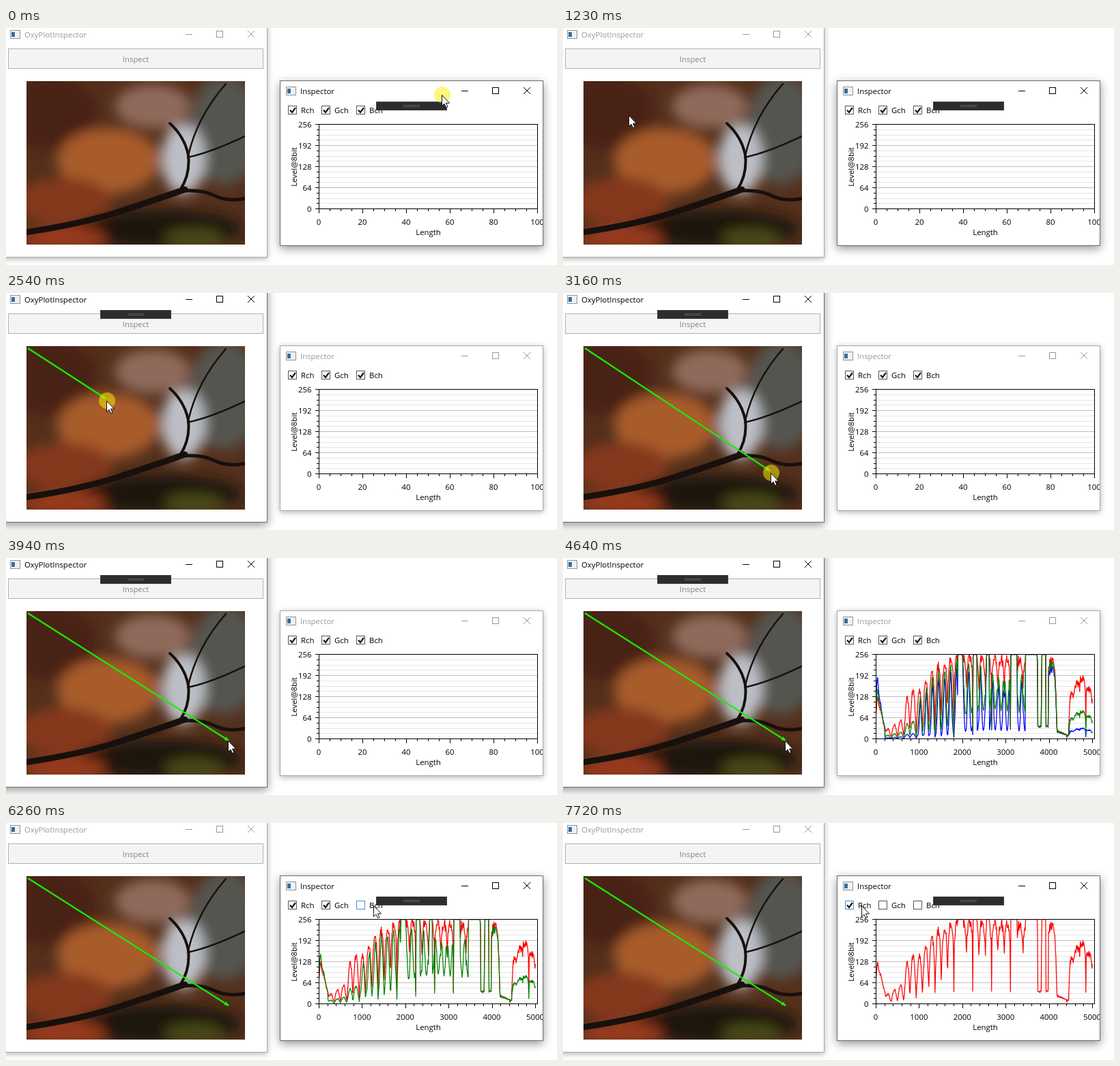
An HTML page that plays this animation: 807x348 px, repeating every 8 s.

```html
<!DOCTYPE html>
<html lang="en">
<head>
<meta charset="utf-8">
<title>Line inspector</title>
<style>
  html, body { margin: 0; width: 100%; height: 100%; overflow: hidden; background: #fff; }
  svg { display: block; width: 807px; height: 348px; }
  text { font: 11.4px "Open Sans", "Noto Sans", sans-serif; fill: #000; }
  .crisp { shape-rendering: crispEdges; }
  .frame { fill: #fff; stroke: #a9a9a9; filter: drop-shadow(0 2px 4px rgba(0,0,0,.3)); }
  .active .frame { stroke: #6c6c6c; filter: drop-shadow(0 4px 7px rgba(0,0,0,.42)); }
  .title { fill: #959b98; }
  .active .title { fill: #000; }
  .controls { fill: none; stroke: #999; }
  .active .controls { stroke: #000; }
  .toolbar { visibility: hidden; }
  .active .toolbar { visibility: visible; }
  .box { fill: #fff; stroke: #555; }
  .hover .box { stroke: #4a90d9; }
  .curve { fill: none; stroke-width: 1.25; stroke-linejoin: round; }
</style>
</head>
<body>
<svg id="stage" viewBox="0 0 807 348"></svg>
<script>
const LOOP = 8000;
const STEP = 77;
const PLOT = { x: 458, w: 320, h: 124, bottom: 265.5 };
const CHANNELS = [
  { name: "Rch", x: 413, color: "#ff0000", off: Infinity },
  { name: "Gch", x: 462, color: "#008000", off: 7180 },
  { name: "Bch", x: 513, color: "#0000ff", off: 6180 }
];

// ---------- helpers ----------
const lerp = (a, b, f) => a + (b - a) * f;
const clamp = (v, lo, hi) => Math.max(lo, Math.min(hi, v));
const range = n => Array.from({ length: n }, (_, i) => i);
const within = (v, spans) => spans.some(([a, b]) => v >= a && v < b);

function seeded(seed) {
  return () => (seed = (seed * 16807) % 2147483647) / 2147483647;
}

function between(points, x) {
  const i = clamp(points.findIndex(p => p[0] > x), 1, points.length - 1);
  const [[x0, y0], [x1, y1]] = [points[i - 1], points[i]];
  return lerp(y0, y1, clamp((x - x0) / (x1 - x0), 0, 1));
}

const label = (x, y, s, anchor = "start", extra = "") =>
  `<text x="${x}" y="${y}" text-anchor="${anchor}" ${extra}>${s}</text>`;

// ---------- window parts ----------
const appIcon = (x, y) => `<g transform="translate(${x} ${y})" class="crisp">
  <rect x=".5" y=".5" width="14" height="12" fill="#eef1f3" stroke="#8d9396"/>
  <rect x="2" y="3" width="5" height="7" fill="#326f9f"/></g>`;

const controls = (x, y) => `<g class="controls" transform="translate(${x} ${y})">
  <path class="crisp" d="M0 5.5h10M45.5 .5h9v9h-9z"/><path d="M91 0l10 10m0-10l-10 10"/></g>`;

const toolbar = (x, y) => `<g class="toolbar crisp" transform="translate(${x} ${y})">
  <rect x=".5" y=".5" width="103" height="12" fill="#2d2d30" stroke="#3f3f46"/>
  <path d="M40 5.5h24M40 7.5h24" stroke="#5c5c60"/></g>`;

// ---------- photo: soft patches of colour and a dark branch ----------
const patch = (x, y, rx, ry, color) =>
  `<ellipse cx="${x}" cy="${y}" rx="${rx}" ry="${ry}" fill="${color}"/>`;

const photo = () => `<g clip-path="url(#photoClip)">
  <rect x="30" y="78" width="320" height="240" fill="#54301c"/>
  <g filter="url(#soft)">
    ${patch(65, 125, 70, 55, "#4a2012")}
    ${patch(215, 115, 55, 32, "#8f6a5c")}
    ${patch(320, 150, 52, 80, "#55544f")}
    ${patch(260, 192, 32, 52, "#bcc0c6")}
    ${patch(150, 195, 75, 48, "#a85c2a")}
    ${patch(85, 255, 70, 35, "#84391a")}
    ${patch(225, 295, 120, 28, "#1a170f")}
    ${patch(85, 308, 62, 16, "#9a3a1a")}
    ${patch(275, 308, 44, 14, "#474a18")}
  </g>
  <g fill="none" stroke="#17100d" stroke-linecap="round">
    <path d="M28 300Q110 288 165 270T262 237" stroke-width="9"/>
    <path d="M250 240Q285 236 305 246T352 250" stroke-width="5"/>
    <path d="M255 238Q270 215 267 187Q262 160 240 140" stroke-width="4"/>
    <path d="M266 190Q300 183 352 158M267 187Q280 130 322 82" stroke-width="2.5"/>
  </g></g>`;

// ---------- chart ----------
function xAxis(id, spacing, unit) {
  const tick = (step, length) => range(Math.floor(PLOT.w / step) + 1)
    .map(i => `M${Math.round(PLOT.x + i * step) + .5} 266v${length}`).join("");
  const names = range(6).map(i => label(PLOT.x + i * spacing, 289, i * unit, "middle")).join("");
  const minor = unit === 20 ? spacing / 4 : spacing / 5;
  return `<g id="${id}"><path class="crisp" d="${tick(minor, 3)}${tick(spacing, 6)}" stroke="#000"/>${names}</g>`;
}

function yAxis() {
  return range(17).map(i => {
    const y = Math.round(265 - i * PLOT.h / 16) + .5, major = i % 4 === 0;
    const grid = major ? 'stroke="#bdbdbd"' : 'stroke="#cacaca" stroke-dasharray="1 1"';
    return `<path class="crisp" d="M${major ? 453 : 455} ${y}H458" stroke="#000"/>
      <path class="crisp" d="M459 ${y}H778" ${grid}/>
      ${major ? label(447.5, y + 4.5, i * 16, "end") : ""}`;
  }).join("");
}

// The profile crosses leaves, with bright sky and dark twigs in places.
const LEAVES = [[0, 40], [2, 60], [14, 12], [40, 30], [48, 74], [62, 66], [80, 98], [110, 120],
  [262, 116], [265, 12], [282, 6], [284, 62], [300, 92], [317, 66]];
const SKY = [[120, 127], [142, 148], [162, 166], [197, 207], [219, 236], [243, 249]];
const TWIGS = [[237, 242], [249, 252]];

function redAt(x) {
  if (within(x, SKY)) return 124;
  if (within(x, TWIGS)) return 18;
  const sharpness = x < 16 ? 0 : x > 252 ? .08 : lerp(1.6, .2, Math.min(1, x / 125));
  const wave = Math.abs(Math.cos((x - 45) * Math.PI / 9.2)) ** sharpness;
  return between(LEAVES, x) * lerp(.15, 1, wave);
}

// Green follows red fully in the sky, and less on sunlit leaves.
function greenGain(x) {
  if (within(x, SKY) || within(x, TWIGS)) return 1;
  if (x < 13) return 1.25 - x / 40;
  if (x > 220) return x < 283 ? .95 : .45;
  const shine = x > 60 ? Math.sin(x * .36) ** 2 : 0;
  return lerp(.36, .92, shine);
}

function curve({ name, color }, power) {
  const random = seeded(71);
  const points = range(529).map(i => {
    const x = i * .6, red = redAt(x);
    const jitter = red > 122 ? 0 : (random() - .5) * (2 + red / 8);
    const h = clamp((red + jitter) * greenGain(x) ** power, 1, PLOT.h);
    return `${(PLOT.x + x + .5).toFixed(1)} ${(PLOT.bottom - h).toFixed(1)}`;
  });
  return `<path id="curve${name}" class="curve" stroke="${color}" d="M${points.join("L")}"/>`;
}

const checkBox = ({ name, x }) => `<g id="${name}">
  <rect class="box crisp" x="${x + .5}" y="114.5" width="12" height="12"/>
  <path class="mark" d="M${x + 3} 120.5l3 3.5 5-7" fill="none" stroke="#1b1b1b" stroke-width="2.2"/>
  ${label(x + 19, 125, name)}</g>`;

// ---------- scene ----------
const [R, G, B] = CHANNELS;
document.getElementById("stage").innerHTML = `
  <defs>
    <clipPath id="photoClip"><rect x="30" y="78" width="320" height="240"/></clipPath>
    <clipPath id="plotClip"><rect x="458" y="141" width="320" height="125"/></clipPath>
    <clipPath id="windowClip"><rect x="402" y="78" width="384" height="241"/></clipPath>
    <filter id="soft"><feGaussianBlur stdDeviation="9"/></filter>
  </defs>
  <g id="mainWindow">
    <rect class="frame" x="-20.5" y="-20.5" width="403" height="357"/>
    ${appIcon(6, 3)}${label(27, 14, "OxyPlotInspector", "start", 'class="title"')}${controls(263, 4)}
    <rect class="crisp" x="3.5" y="30.5" width="373" height="29" fill="#f4f4f4" stroke="#adb2b5"/>
    ${label(190, 50, "Inspect", "middle", 'style="fill:#838383"')}
    ${photo()}
    <g id="ruler" fill="#14f000" stroke="#14f000">
      <path id="rulerLine" stroke-width="2.2"/>
      <path id="rulerHead" d="M1 0L-6 -3V3Z" stroke="none"/>
    </g>
    ${toolbar(138, 25)}
  </g>
  <g id="chartWindow">
    <rect class="frame" x="401.5" y="77.5" width="385" height="242"/>
    ${appIcon(410, 86)}${label(431, 97, "Inspector", "start", 'class="title"')}${controls(667, 87)}
    ${CHANNELS.map(checkBox).join("")}
    <g clip-path="url(#windowClip)">
      ${yAxis()}
      ${xAxis("emptyAxis", 64, 20)}${xAxis("dataAxis", 63.4, 1000)}
      <g id="curves" clip-path="url(#plotClip)">${curve(B, 2.2)}${curve(R, 0)}${curve(G, 1)}</g>
      <rect class="crisp" x="458.5" y="141.5" width="320" height="124" fill="none" stroke="#000"/>
      ${label(618.5, 304, "Length", "middle")}
      ${label(0, 0, "Level@8bit", "middle", 'transform="translate(426 204) rotate(-90)"')}
    </g>
    ${toolbar(542, 108)}
  </g>
  <g id="pointer">
    <circle id="press" r="12" fill="#fff000" fill-opacity=".52"/>
    <path d="M-.5 .5V16.5L3 13.2L5.6 18.6L8 17.5L5.5 12.2H10.5Z" fill="#fff" stroke="#111"/>
  </g>`;

// ---------- motion ----------
const smooth = f => f * f * (3 - 2 * f);
const speedUp = f => f ** 1.3;
const slowDown = f => 1 - (1 - f) ** 2;

const MOVES = [
  { from: 460, to: 1230, x: 97, y: 128 },
  { from: 1300, to: 2000, x: 38, y: 84 },
  { from: 2160, to: 2540, x: 148, y: 158, ease: speedUp },
  { from: 2610, to: 2930, x: 271, y: 257, ease: f => f },
  { from: 3000, to: 3540, x: 326, y: 268, ease: slowDown },
  { from: 5100, to: 5640, x: 537, y: 127 },
  { from: 5870, to: 6260, x: 539, y: 121 },
  { from: 6720, to: 7030, x: 491, y: 121 },
  { from: 7410, to: 7720, x: 438, y: 121 }
];
const PRESSES = [[0, 230], [2000, 3860], [5950, 6180], [7030, 7180]];
const MAIN_ACTIVE = [[2000, 5950]];
const DRAG = { from: 2160, to: 3860, x: 32, y: 81 };
const DATA_READY = 4640;

// The pointer advances in even time steps, like a screen recording.
function pointerAt(t) {
  let x = 639, y = 98;
  for (const { from, to, x: tx, y: ty, ease = smooth } of MOVES) {
    if (t < from) break;
    const steps = Math.round((to - from) / STEP) + 1;
    const done = Math.floor((t - from) / (to - from) * (steps - 1) + .03) + 1;
    const f = ease(Math.min(1, done / steps));
    x = lerp(x, tx, f);
    y = lerp(y, ty, f);
  }
  return [Math.round(x), Math.round(y)];
}

const el = id => document.getElementById(id);
const show = (node, on) => { node.style.display = on ? "" : "none"; };

function draw(t) {
  const [x, y] = pointerAt(t);
  el("pointer").setAttribute("transform", `translate(${x} ${y})`);
  show(el("press"), within(t, PRESSES));

  const mainActive = within(t, MAIN_ACTIVE);
  el("mainWindow").classList.toggle("active", mainActive);
  el("chartWindow").classList.toggle("active", !mainActive);

  show(el("ruler"), t >= DRAG.from);
  const [ex, ey] = t < DRAG.to ? [x - 2, y - 3] : [326, 268];
  const angle = Math.atan2(ey - DRAG.y, ex - DRAG.x) * 180 / Math.PI;
  el("rulerLine").setAttribute("d", `M${DRAG.x} ${DRAG.y}L${ex} ${ey}`);
  el("rulerHead").setAttribute("transform", `translate(${ex} ${ey}) rotate(${angle})`);

  const ready = t >= DATA_READY;
  show(el("emptyAxis"), !ready);
  show(el("dataAxis"), ready);
  show(el("curves"), ready);
  for (const c of CHANNELS) {
    const on = t < c.off, group = el(c.name);
    show(group.querySelector(".mark"), on);
    show(el("curve" + c.name), on);
    group.classList.toggle("hover", x >= c.x && x < c.x + 39 && y >= 114 && y <= 127);
  }
}

const began = performance.now();
function tick() {
  draw((performance.now() - began) % LOOP);
  requestAnimationFrame(tick);
}
tick();
</script>
</body>
</html>
```
